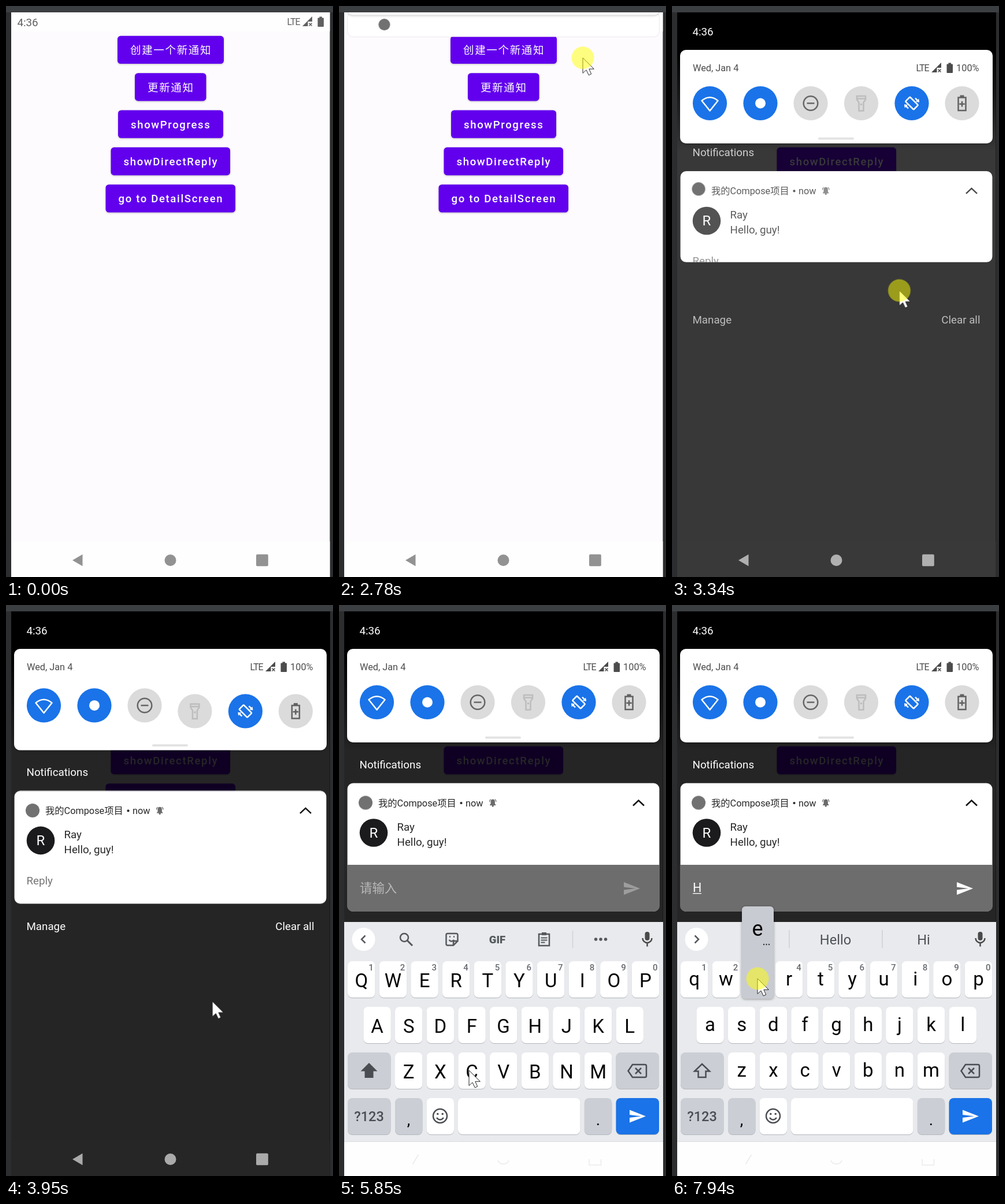
Write an HTML page that moves like this. It is 566 by 989 pixels and loops after 8 s.

```html
<!DOCTYPE html>
<html lang="zh">
<head>
<meta charset="utf-8">
<title>Notification reply</title>
<style>
html, body { margin: 0; height: 100%; overflow: hidden; background: #2b2d2f; }
svg { display: block; width: 100vw; height: 100vh; font-family: Roboto, "Noto Sans CJK SC", "Noto Sans CJK", sans-serif; }
svg * { animation-duration: 8s; animation-timing-function: linear; animation-iteration-count: infinite; }
text { white-space: pre; }
.line { fill: none; stroke-width: 2.5; }
.mid { text-anchor: middle; }
.end { text-anchor: end; }
.btn text { font-size: 18.5px; font-weight: 500; letter-spacing: 1.67px; fill: #fff; }
.btn .cjk { font-weight: 400; }
.btn rect { fill: #6200ee; filter: drop-shadow(0 1px 1.5px rgba(0,0,0,.25)); }
.t14 { font-size: 18.75px; }
.t12 { font-size: 16.3px; }

@property --e { syntax: "<number>"; inherits: true; initial-value: 0; }

/* Percentages are ms / 80 */
.cursor { animation-name: cursor; }
@keyframes cursor {
  0%, 2.36% { transform: translate(620px, 1000px); }
  2.375% { transform: translate(556px, 941px); animation-timing-function: cubic-bezier(.3,.3,.4,1); }
  12% { transform: translate(308px, 273px); }
  13.75%, 19% { transform: translate(305px, 269px); animation-timing-function: ease-in-out; }
  26.5% { transform: translate(410px, 57px); }
  28%, 32.4% { transform: translate(421px, 30px); animation-timing-function: ease-in; }
  34.75% { transform: translate(422px, 89px); }
  39.125% { transform: translate(410px, 333px); }
  42.625% { transform: translate(388px, 545px); animation-timing-function: ease-out; }
  46.5%, 49.375% { transform: translate(358px, 687px); }
  52.875% { transform: translate(124px, 562px); animation-timing-function: ease-out; }
  58%, 65.2% { transform: translate(45px, 464px); animation-timing-function: ease-in-out; }
  71.375% { transform: translate(222px, 812px); }
  73.125%, 76% { transform: translate(225px, 806px); }
  81.875% { transform: translate(307px, 742px); }
  84.5%, 87.25% { transform: translate(338px, 724px); animation-timing-function: ease-in-out; }
  92.25% { transform: translate(181px, 679px); animation-timing-function: ease-out; }
  95%, 100% { transform: translate(148px, 647px); }
}
.press { animation-name: press; animation-timing-function: step-end; }
@keyframes press {
  0%, 18.8%, 48.5%, 63.1%, 86.75% { opacity: 0; }
  17.125%, 31.25%, 61.375%, 85%, 98.375%, 100% { opacity: 1; }
}
.ripple { fill: #fff; animation-name: ripple; }
@keyframes ripple {
  0%, 17% { r: 10px; opacity: 0; }
  17.125% { r: 20px; opacity: .24; }
  20% { r: 130px; opacity: .24; }
  22.5%, 100% { r: 130px; opacity: 0; }
}
.mark { animation-name: mark; }
@keyframes mark { 0%, 19.5% { opacity: 0; } 21.5%, 100% { opacity: 1; } }
.status { animation-name: status; }
@keyframes status { 0%, 33% { opacity: 1; } 34.2%, 100% { opacity: 0; } }

.scrim { animation-name: scrim; }
@keyframes scrim { 0%, 34.75% { opacity: 0; } 39.125% { opacity: .55; } 42.625%, 100% { opacity: .85; } }
.shade { animation-name: stretch; }
@keyframes stretch {
  0%, 42.625% { --e: 0; animation-timing-function: ease-out; }
  47%, 48.5% { --e: 1.08; }
  49.375% { --e: 1; animation-timing-function: ease-out; }
  52.7%, 100% { --e: 0; }
}
.low { transform: translateY(calc(var(--e) * 13.5px)); }
.row1 { transform: translateY(calc(var(--e) * 5.5px)); }
.row2 { transform: translate(calc(var(--e) * -.6px), calc(var(--e) * 15.5px)); }
.panel { height: calc(162px + var(--e) * 13.5px); filter: drop-shadow(0 1px 2px rgba(0,0,0,.25)); }
.head { animation-name: head; }
@keyframes head {
  0%, 32.9% { transform: translateY(-238px); }
  34.75% { transform: translateY(-223px); }
  39.125% { transform: translateY(-25.5px); animation-timing-function: ease-out; }
  41.5%, 100% { transform: none; }
}
.black { animation-name: black; }
@keyframes black { 0%, 34.75% { opacity: 0; } 37.5%, 100% { opacity: 1; } }
.card { animation-name: card; }
@keyframes card {
  0%, 32.9% { y: -45px; height: 43px; }
  34.75% { y: 10px; height: 43px; }
  39.125% { y: 217px; height: 43px; }
  42.625%, 64% { y: 308.5px; height: 195.5px; }
  64.875% { y: 308.5px; height: 200.5px; animation-timing-function: ease-out; }
  68%, 100% { y: 308.5px; height: 222.5px; }
}
.dot { animation-name: dot; }
@keyframes dot {
  0%, 32.9% { transform: translate(78.5px, -24px) scale(.84); }
  34.75% { transform: translate(78.5px, 31.5px) scale(.84); }
  39.125% { transform: translate(46px, 238.5px) scale(.84); }
  42.625%, 100% { transform: translate(46px, 342.5px); }
}
.body { animation-name: body; }
@keyframes body {
  0%, 39.125% { transform: translateY(-91.5px); opacity: 0; }
  42.625%, 100% { transform: none; opacity: 1; }
}
.foot { animation-name: foot; }
@keyframes foot {
  0%, 40% { opacity: 0; transform: none; }
  42.625%, 64% { opacity: 1; transform: none; }
  64.875% { opacity: .65; transform: translateY(5px); }
  67%, 100% { opacity: 0; transform: translateY(20px); }
}
.input { animation-name: input; }
@keyframes input {
  0%, 64% { transform: translateY(-27px); }
  64.875% { transform: translateY(-22px); animation-timing-function: ease-out; }
  68%, 100% { transform: none; }
}
.reveal { animation-name: reveal; }
@keyframes reveal { 0%, 63.1% { r: 0px; } 64.875% { r: 343px; } 66.8%, 100% { r: 530px; } }
.open { animation-name: open; animation-timing-function: step-end; }
@keyframes open { 0% { opacity: 0; } 64%, 100% { opacity: 1; } }
.caret { animation-name: caret; animation-timing-function: step-end; }
@keyframes caret {
  0%, 70.25%, 82.75% { opacity: 0; transform: none; }
  64%, 76.5% { opacity: 1; transform: none; }
  86.75% { opacity: 1; transform: translateX(15px); }
  93%, 100% { opacity: 0; transform: translateX(15px); }
}
.before { animation-name: before; animation-timing-function: step-end; }
@keyframes before { 0% { opacity: 1; } 86.75%, 100% { opacity: 0; } }
.after { animation-name: after; animation-timing-function: step-end; }
@keyframes after { 0% { opacity: 0; } 86.75%, 100% { opacity: 1; } }

.nav { animation-name: nav; }
@keyframes nav { 0%, 34.75% { fill: #929292; } 39.125% { fill: #c3c3c3; } 42.625%, 100% { fill: #aaa; } }
.light { animation-name: light; }
@keyframes light { 0%, 67% { opacity: 0; } 70%, 100% { opacity: 1; } }
.board { animation-name: board; }
@keyframes board {
  0%, 66.6% { transform: translateY(440px); animation-timing-function: cubic-bezier(.1,.6,.3,1); }
  70.8%, 100% { transform: none; }
}
.key { fill: #fff; filter: drop-shadow(0 1.5px .5px rgba(60,64,72,.3)); }
.grey { fill: #cbced5; }
.blue { fill: #1a73e8; }
.glyph { font-size: 33px; text-anchor: middle; fill: #050505; }
.hint { font-size: 15px; font-weight: 500; text-anchor: middle; fill: #666a6f; }
.word { font-size: 23.6px; text-anchor: middle; fill: #4d5156; }
.pop rect { fill: #c9cbd2; filter: drop-shadow(0 1px 2px rgba(0,0,0,.35)); }
.popH, .popE { animation-timing-function: step-end; }
.popH { animation-name: popH; }
.popE { animation-name: popE; }
@keyframes popH { 0%, 86.75%, 100% { opacity: 0; } 85% { opacity: 1; } }
@keyframes popE { 0% { opacity: 0; } 98.375%, 100% { opacity: 1; } }
</style>
</head>
<body>
<svg viewBox="0 0 566 989">
<defs>
  <clipPath id="screen"><rect x="9" y="11" width="551.5" height="978"/></clipPath>
  <clipPath id="cardClip"><rect class="card" x="14" width="541" rx="10"/></clipPath>
  <clipPath id="inputClip"><path d="M14 450H555V521a10 10 0 0 1-10 10H24a10 10 0 0 1-10-10z"/></clipPath>
  <clipPath id="btnClip"><rect x="181.5" y="245" width="206.5" height="48.3" rx="5.5"/></clipPath>
  <linearGradient id="fade" gradientUnits="userSpaceOnUse" x1="0" y1="80" x2="0" y2="250">
    <stop offset="0"/><stop offset="1" stop-opacity="0"/>
  </linearGradient>
  <path id="plane" d="M0 0L28 11 0 22V13.5L20 11 0 8.5z"/>
  <g id="signal">
    <text x="486.5" y="33" font-size="16" letter-spacing="-1">LTE</text>
    <path d="M513 35L530 18V27H522.5V35z"/>
    <path d="M524.5 29.5l5 5m0-5l-5 5" stroke="currentColor" stroke-width="1.6"/>
    <path d="M542.5 18.5h4.500v2h2a1 1 0 0 1 1 1v13.500a1 1 0 0 1-1 1h-8.500a1 1 0 0 1-1-1v-13.500a1 1 0 0 1 1-1h2z"/>
  </g>
</defs>

<rect width="566" height="11" fill="#3c3f42"/>

<g clip-path="url(#screen)">
  <rect x="9" y="11" width="552" height="978" fill="#fdfbfe"/>
  <path d="M9 11h552v33H9zM9 927h552v62H9z" fill="#fefefe"/>
  <g class="status" fill="#606060" color="#606060">
    <text class="t14" x="19.500" y="35">4:36</text>
    <use href="#signal"/>
    <circle class="mark" cx="79" cy="28" r="9"/>
  </g>
  <g class="btn" id="buttons"></g>
  <g clip-path="url(#btnClip)"><circle class="ripple" cx="305" cy="269"/></g>
  <rect class="scrim" x="9" y="11" width="552" height="978"/>

  <g class="nav">
    <path d="M115 960L132.500 949.800V970.200z" stroke-linejoin="round"/>
    <circle cx="284.500" cy="960" r="10"/>
    <rect x="433" y="949.800" width="20.800" height="20.400" rx="2"/>
    <g class="open">
      <path d="M513 955h20M513 959h20" stroke="#aaa" stroke-width="2" stroke-dasharray="2.500 1.900"/>
      <path d="M516 963h14M519 966.500h8" stroke="#aaa" stroke-width="2"/>
    </g>
  </g>

  <g class="shade">
    <g class="head"><rect class="black" x="9" y="-20" width="552" height="270" fill="url(#fade)"/></g>
    <g class="low">
      <rect class="card" x="14.500" width="540" rx="10" fill="#fff" stroke="#000" stroke-opacity=".08"/>
      <g clip-path="url(#cardClip)">
        <g class="body" fill="#282828">
          <text class="t12" x="68" y="349">我的Compose项目</text>
          <circle cx="211.500" cy="343" r="2.100"/>
          <text class="t12" x="219" y="349">now</text>
          <g fill="#6b6b6b">
            <path d="M261 347v-1l1.500-1.500v-4a3.600 4 0 0 1 7.400 0v4l1.500 1.500v1z"/>
            <circle cx="266.200" cy="348" r="1.700"/>
            <path d="M260.500 341q0-3 2-4.500M272 341q0-3-2-4.500" fill="none" stroke="#6b6b6b" stroke-width="1.200"/>
          </g>
          <path class="line" d="M509 347.500l9.500-9 9.500 9" stroke="#111"/>
          <circle cx="60" cy="394.500" r="24.300" fill="#1b1b1d"/>
          <text class="mid" x="60" y="402.500" font-size="24" fill="#fff">R</text>
          <text class="t14" x="100.500" y="391">Ray</text>
          <text class="t14" x="100.500" y="417">Hello, guy!</text>
          <text class="t14" x="35.500" y="470.500" fill="#757575">Reply</text>
        </g>
        <circle class="dot" r="12" fill="#717171"/>
      </g>
      <g class="input">
        <g clip-path="url(#inputClip)"><circle class="reveal" cx="45" cy="490" r="0" fill="#6d6d6d"/></g>
        <g class="open">
          <g class="before">
            <text x="36" y="497.500" font-size="21.400" fill="#b8b8b8">请输入</text>
            <use href="#plane" x="493" y="480" fill="#9d9d9d"/>
          </g>
          <g class="after" fill="#fff">
            <text x="36" y="497" font-size="21.400">H</text>
            <rect x="36" y="499" width="15" height="1.300"/>
            <use href="#plane" x="493" y="480"/>
          </g>
        </g>
        <rect class="caret" x="36.500" y="475" width="2" height="28" fill="#fff"/>
      </g>
      <g class="body"><text class="t14" x="35.500" y="283" fill="#fff">Notifications</text></g>
      <g class="foot t14" fill="#fff">
        <text x="35.500" y="549.500">Manage</text>
        <text class="end" x="533.500" y="549.500">Clear all</text>
      </g>
    </g>

    <g class="head">
      <text class="t14" x="35.500" y="50.500" fill="#fff">4:36</text>
      <rect class="panel" x="14" y="76" width="541" rx="10" fill="#fff"/>
      <g fill="#4c4c4c" color="#4c4c4c">
        <text class="t12" x="36" y="113">Wed, Jan 4</text>
        <use href="#signal" x="-64" y="80"/>
        <text class="t12 end" x="531.500" y="113">100%</text>
      </g>
      <g class="row1">
        <circle class="blue" cx="65.500" cy="168.500" r="29.600"/>
        <path class="line" d="M51.500 164Q65.500 152.500 79.500 164L65.500 181.500z" stroke="#fff" stroke-linejoin="round"/>
        <circle class="blue" cx="153" cy="168.500" r="29.600"/>
        <circle cx="153" cy="168.500" r="9" fill="#fff"/>
        <circle cx="240" cy="168.500" r="29.600" fill="#dbdbdb"/>
        <circle class="line" cx="240" cy="168.500" r="12.300" stroke="#666"/>
        <path class="line" d="M233.500 168.500h13" stroke="#666"/>
      </g>
      <g class="row2">
        <circle cx="327.500" cy="168.500" r="29.600" fill="#dbdbdb"/>
        <path class="line" d="M320 156h15v6l-3.500 5v14.500h-8V167l-3.500-5zM320 160.500h15" stroke="#bdbdbd"/>
        <circle cx="327.500" cy="170.500" r="1.800" fill="#bdbdbd"/>
        <circle class="blue" cx="415" cy="168.500" r="29.600"/>
        <g class="line" stroke="#fff" transform="translate(415 168.500) rotate(45)">
          <rect x="-10" y="-5.500" width="20" height="11" rx="1"/>
          <path d="M-6 10.500H2M6 -10.500H-2"/>
          <path d="M-3 6.800v7.400l-5-3.700zM3 -6.800v-7.400l5 3.700z" fill="#fff" stroke="none"/>
        </g>
        <circle cx="502" cy="168.500" r="29.600" fill="#dbdbdb"/>
        <path class="line" d="M495.500 158.500h13v22.500h-13zM502 165v9.500M497.300 169.700h9.400" stroke="#616161"/>
        <rect x="498.500" y="154.500" width="7" height="4" fill="#616161"/>
      </g>
      <rect class="low" x="253" y="227.800" width="62" height="3.800" rx="1.900" fill="#e2e2e2"/>
    </g>
  </g>

  <g class="board">
    <rect x="9" y="549" width="552" height="440" fill="#e8eaed"/>
    <circle cx="42.500" cy="579" r="20" fill="#fff"/>
    <g class="before" fill="#55585c" stroke="#55585c">
      <path class="line" d="M45.500 572.500l-6.500 6.500 6.500 6.500"/>
      <circle class="line" cx="113" cy="576" r="7"/>
      <path class="line" d="M118 581l9 9" style="stroke-width:3"/>
      <path class="line" d="M188 569h15a2.500 2.500 0 0 1 2.500 2.500V582l-7.500 7.500h-10a2.500 2.500 0 0 1-2.500-2.500v-15.500a2.500 2.500 0 0 1 2.500-2.500zM205.500 582h-5q-2.500 0-2.500 2.500v5M190.500 580q4 5 8.500 0"/>
      <path d="M191 574.500h2M198 574.500h2" stroke-width="2.500"/>
      <text class="mid" x="274" y="585.500" font-size="18.500" font-weight="800" stroke="none">GIF</text>
      <path class="line" d="M346 570h18v20h-18z"/>
      <path d="M351 567h8v5h-8z" stroke="none"/>
      <path class="line" d="M349.500 576.500h11M349.500 580.500h11M349.500 584.500h7" style="stroke-width:2"/>
      <path d="M404.500 564v30" stroke="#d0d3d7" stroke-width="1.500"/>
      <path d="M444.500 579h.01M453 579h.01M461.500 579h.01" stroke-width="5.500" stroke-linecap="round"/>
    </g>
    <g class="after">
      <path class="line" d="M39.500 572.500l6.500 6.500-6.500 6.500" stroke="#55585c"/>
      <path d="M203 563v31M364 563v31" stroke="#cdd0d4" stroke-width="1.500"/>
      <text class="word" x="133" y="588">H</text>
      <text class="word" x="283" y="588">Hello</text>
      <text class="word" x="435.500" y="588">Hi</text>
    </g>
    <rect x="529.500" y="566" width="8" height="15" rx="4" fill="#4a4a4a"/>
    <path class="line" d="M525.500 577a8 8 0 0 0 16 0M533.500 585v6.500" stroke="#4a4a4a"/>

    <g id="keys"></g>
    <g fill="#4a4d51" stroke="#4a4d51">
      <path class="before" d="M52 793l14.500 14.500H59.500V819h-15v-11.500H37.500z" stroke="none"/>
      <path class="line after" d="M52 795l13 12.500h-6.500V818h-13v-10.500H39z"/>
      <path class="line" d="M508 796h21.500a2.500 2.500 0 0 1 2.500 2.500v17a2.500 2.500 0 0 1-2.500 2.500H508l-7.500-11zM513 802l10 10m0-10l-10 10"/>
      <circle class="line" cx="175" cy="885" r="12"/>
      <path class="line" d="M169 888q6 7 12 0"/>
      <path d="M170.800 881.500h.01M179.200 881.500h.01" stroke-width="3.600" stroke-linecap="round"/>
      <text class="mid" x="52" y="894" font-size="23.500" font-weight="500" stroke="none">?123</text>
    </g>
    <text class="glyph" x="120.500" y="901" style="font-size:28px">,</text>
    <text class="glyph" x="448.500" y="901" style="font-size:28px">.</text>
    <use href="#plane" x="503" y="874.500" fill="#fff"/>
    <g class="pop popH">
      <rect x="312" y="601" width="55" height="160" rx="6"/>
      <text class="glyph" x="339.500" y="651" style="font-size:36px">H</text>
    </g>
    <g class="pop popE">
      <rect x="121" y="522" width="55" height="160" rx="6"/>
      <text class="glyph" x="148" y="573" style="font-size:36px">e</text>
      <path d="M159 588h.01M163.500 588h.01M168 588h.01" stroke="#333" stroke-width="2.400" stroke-linecap="round"/>
    </g>
  </g>

  <g class="light">
    <rect x="9" y="929" width="552" height="60" fill="#fefefe"/>
    <path d="M9 929.500h552" stroke="#dcdee1"/>
    <path d="M127.500 968.500l10-16.500M275 962a10 9 0 0 0 19 0M433 960v10h20.500v-10" fill="none" stroke="#ebebeb" stroke-width="1.600"/>
  </g>
</g>

<g class="cursor">
  <path d="M0 0V26.500L6 21 10.300 30 14.700 28 10.800 19.300H19.300z" fill="#fff" stroke="#222"/>
  <circle class="press" r="19.500" fill="#ff0" fill-opacity=".5"/>
</g>
</svg>
<script>
const fill = (id, html) => document.getElementById(id).innerHTML = html;

const buttons = [
  ['创建一个新通知', 193, 184], ['更新通知', 223, 123.5], ['showProgress', 194, 182],
  ['showDirectReply', 181.5, 206.5], ['go to DetailScreen', 172.5, 224.5]
];
fill('buttons', buttons.map(([label, x, w], i) => {
  const y = 51.8 + i * 64.35, cjk = i < 2;
  return `<rect x="${x}" y="${y}" width="${w}" height="48.3" rx="5.500"/>
    <text class="${cjk ? 'cjk' : ''}" x="${x + 22}" y="${y + (cjk ? 31.5 : 31)}">${label}</text>`;
}).join(''));

const pitch = 54.64, keyW = 47.5;
const key = (x, y, w = keyW, tone = '') =>
  `<rect class="key ${tone}" x="${x}" y="${y}" width="${w}" height="63" rx="8"/>`;
const glyph = (x, y, ch, when) => `<text class="glyph ${when}" x="${x}" y="${y}">${ch}</text>`;

let html = '';
[['qwertyuiop', 15], ['asdfghjkl', 42.3], ['zxcvbnm', 97]].forEach(([row, left], r) => {
  const y = 617 + r * 79;
  [...row].forEach((ch, i) => {
    const x = left + i * pitch, mid = x + keyW / 2;
    html += key(x, y) + glyph(mid, y + 45, ch.toUpperCase(), 'before') + glyph(mid, y + 42, ch, 'after');
    if (!r) html += `<text class="hint" x="${x + 40.5}" y="${y + 16}">${(i + 1) % 10}</text>`;
  });
});
html += key(15, 775, 74.5, 'grey') + key(479.5, 775, 74.5, 'grey')
  + key(15, 854, 74.5, 'grey') + key(97, 854, keyW, 'grey') + key(151.5, 854)
  + key(206, 854, 211.5) + key(424.8, 854, keyW, 'grey') + key(479.5, 854, 74.5, 'blue');
fill('keys', html);
</script>
</body>
</html>
```
